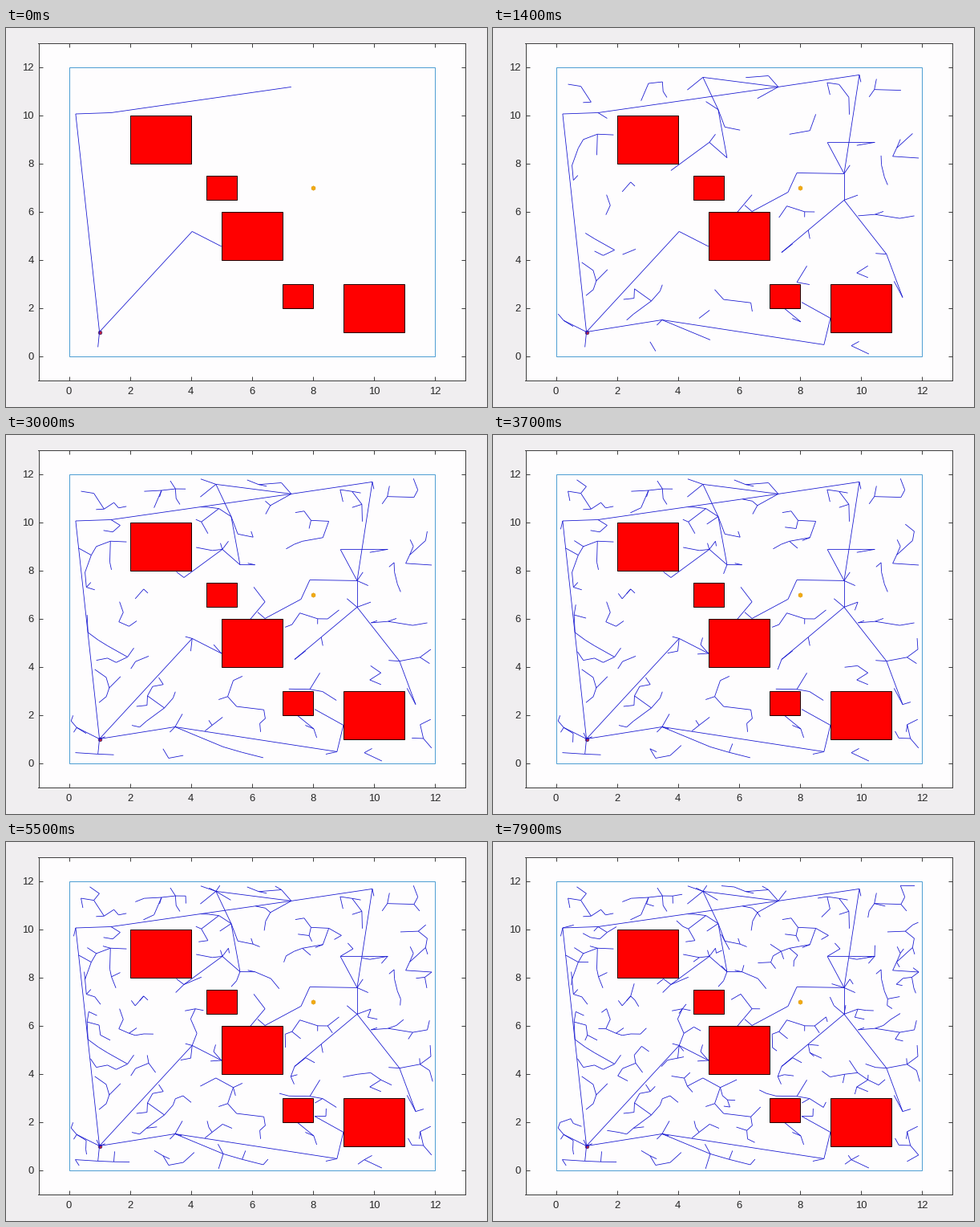
Animation, 600 px wide and 472 px high, one loop 8 s. Source, as a matplotlib script:

```python
import numpy as np
import matplotlib.pyplot as plt
from matplotlib.animation import FuncAnimation
from matplotlib.collections import LineCollection
from matplotlib.patches import Rectangle

W, H, DPI = 600, 472, 100
FRAMES, STEP_MS = 80, 100
PX = 72 / DPI  # one pixel in points
SIZE = 12
INK = "#404040"

OBSTACLES = [(2, 8, 2, 2), (4.5, 6.5, 1, 1), (5, 4, 2, 2), (7, 2, 1, 1), (9, 1, 2, 2)]
ROOT, GOAL = (1, 1), (8, 7)

# Long branches that shape the tree; all other growth follows the sampling rule
START = [
    [(7.29, 11.17), (1.38, 10.1), (0.22, 10.05), ROOT, (4.04, 5.17), (5, 4.55)],
    [ROOT, (0.95, 0.37)],
]
TRUNK = [
    [(7.29, 11.17), (4.82, 11.57), (5.32, 10.23), (5.61, 8.23), (5.03, 8.87), (3.77, 7.7)],
    [(7.29, 11.17), (9.95, 11.67), (9.45, 7.57), (9.45, 6.47), (10.84, 4.23), (11.37, 2.43)],
    [(9.45, 6.47), (7.4, 4.3)],
    [(9.45, 7.57), (7.9, 7.6), (7.61, 6.8), (6.43, 6)],
    [(9.45, 7.57), (8.9, 8.87), (10.45, 8.87)],
    [ROOT, (3.48, 1.5), (8.79, 0.47), (9, 1.57), (8.06, 2.23)],
    [(3.48, 1.5), (5.06, 0.67)],
]
TRUNK_FRAMES = 13
GROWTH = 425


def edges(lines):
    return [(np.array(a, float), np.array(b, float))
            for line in lines for a, b in zip(line, line[1:])]


def blocked(p):
    in_box = any(x - 0.05 < p[0] < x + w + 0.05 and y - 0.05 < p[1] < y + h + 0.05
                 for x, y, w, h in OBSTACLES)
    return in_box or np.hypot(*(p - GOAL)) < 0.9


def cross(u, v):
    return u[..., 0] * v[..., 1] - u[..., 1] * v[..., 0]


def crosses(a, b, segs):
    s = np.array(segs)
    c, d = s[:, 0], s[:, 1]
    side1 = cross(b - a, c - a) * cross(b - a, d - a)
    side2 = cross(d - c, a - c) * cross(d - c, b - c)
    return bool(np.any((side1 < 0) & (side2 < 0)))


def sprout(rng, nodes, segs, age):
    """Sample free space and reach for the sample from the nearest node."""
    pts = np.array(nodes)
    for _ in range(400):
        sample = rng.uniform(0.05, SIZE - 0.05, 2)
        dist = np.hypot(*(pts - sample).T)
        near, d = pts[dist.argmin()], dist.min()
        if d < 0.2:
            continue
        reach = min(d, rng.uniform(0.35, 0.95) * (1 - 0.45 * age))
        step = (sample - near) / d * reach
        # a sample far from every node starts a loose twig
        a = sample - step if d > 1.1 else near
        b = a + step
        if not (blocked(b) or blocked((a + b) / 2) or crosses(a, b, segs)):
            return a, b
    return None


def grow():
    """Return all segments in order of birth and the count shown per frame."""
    rng = np.random.default_rng(12)
    born, trunk = edges(START), edges(TRUNK)
    shown = [len(born)]
    for f in range(1, FRAMES):
        age = f / (FRAMES - 1)
        target = shown[0] + round(GROWTH * age ** 0.75)
        cut = [round(len(trunk) * min(1, k / TRUNK_FRAMES)) for k in (f - 1, f)]
        born += trunk[cut[0]:cut[1]]
        nodes = [p for seg in born for p in seg]
        while len(born) < target:
            seg = sprout(rng, nodes, born + trunk, age)
            if seg is None:
                break
            born.append(seg)
            nodes += seg
        shown.append(len(born))
    return born, shown


fig = plt.figure(figsize=(W / DPI, H / DPI), dpi=DPI, facecolor="#f0eef0")
ax = fig.add_axes([40.5 / W, 33.5 / H, 532.5 / W, 420 / H], facecolor="#fefdfe")
ax.set(xlim=(-1, 13), ylim=(-1, 13),
       xticks=range(0, 13, 2), yticks=range(0, 13, 2))
ax.tick_params(direction="in", top=True, right=True, length=5 * PX, width=PX,
               color=INK, labelcolor="#262626", labelsize=13 * PX,
               labelfontfamily="Liberation Sans")
ax.tick_params(axis="x", pad=8.5 * PX)
ax.tick_params(axis="y", pad=5.5 * PX)
for spine in ax.spines.values():
    spine.set(linewidth=PX, edgecolor=INK)


def box(x, y, w, h, **style):
    ax.add_patch(Rectangle((x, y), w, h, lw=PX, **style))


box(0, 0, SIZE, SIZE, fc="none", ec="#4f9fd3", zorder=1)
for rect in OBSTACLES:
    box(*rect, fc="#ff0000", ec="#200000", zorder=4)
ax.plot(*ROOT, "o", ms=4.5 * PX, mfc="#c02040", mec="#503070", mew=0.8 * PX, zorder=2)
ax.plot(*GOAL, "h", ms=5.5 * PX, mfc="#f2aa10", mec="#e09a10", mew=0.6 * PX, zorder=5)

segments, shown = grow()
tree = LineCollection([], colors="#1414d0", linewidths=0.8 * PX, zorder=3)
ax.add_collection(tree, autolim=False)


def draw(f):
    tree.set_segments(segments[:shown[f]])
    return (tree,)


anim = FuncAnimation(fig, draw, frames=FRAMES, interval=STEP_MS, repeat=True, repeat_delay=0)
plt.show()
```
